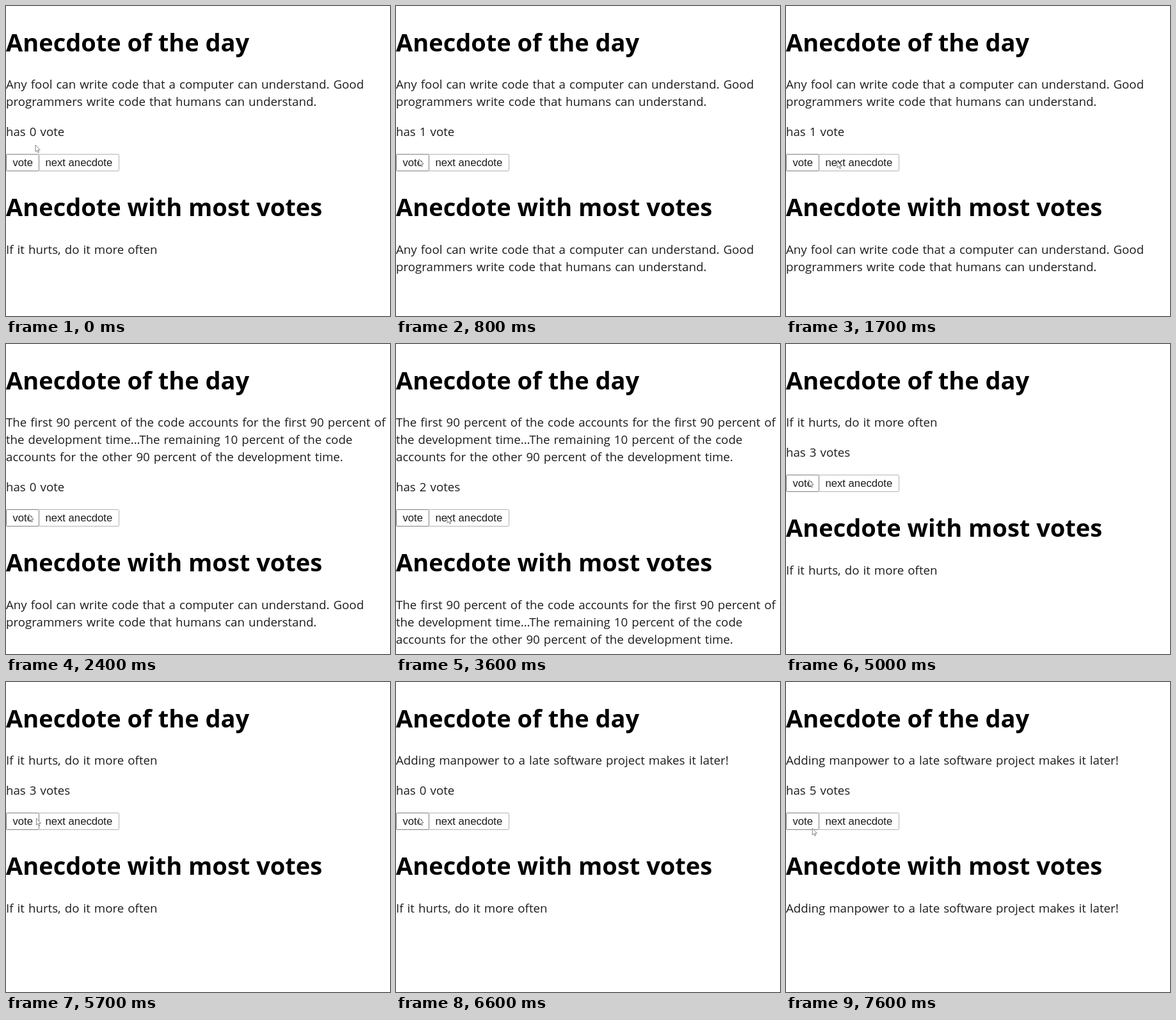
An HTML page that plays this animation: 600x484 px, repeating every 7.7 s.

```html
<!DOCTYPE html>
<html lang="en">
<head>
<meta charset="utf-8">
<title>Anecdotes</title>
<style>
  html, body { margin: 0; width: 100%; height: 100%; overflow: hidden; background: #fff; }
  svg { display: block; }
  text { font: 18.7px "Open Sans", "Noto Sans", sans-serif; word-spacing: 1.2px; fill: #1c1c1c; }
  .title { font-size: 38px; font-weight: 700; word-spacing: 0; fill: #000; }
  .label { font: 16.667px "Liberation Sans", Arial, sans-serif; word-spacing: 0; }
  rect { fill: #fff; stroke: #808080; }
  .next { stroke: #b4b4b4; }
  .arrow { fill: #fff; stroke: #666; stroke-width: .8; }
  .beam { fill: none; stroke: #666; }
</style>
</head>
<body>
<svg id="stage" width="600" height="484"></svg>
<script>
const LOOP = 7700, STEP = 100, LINE = 26.75, GLIDE = 300;

const anecdotes = [
  ["If it hurts, do it more often"],
  ["Adding manpower to a late software project makes it later!"],
  ["The first 90 percent of the code accounts for the first 90 percent of",
   "the development time...The remaining 10 percent of the code",
   "accounts for the other 90 percent of the development time."],
  ["Any fool can write code that a computer can understand. Good",
   "programmers write code that humans can understand."]
];

// Each round shows one anecdote, which is voted for and then skipped.
const rounds = [
  { start: 0, pick: 3, votes: 1 },
  { start: 1900, pick: 2, votes: 2 },
  { start: 3800, pick: 0, votes: 3 },
  { start: 6100, pick: 1, votes: 5 }
];
const HOME = [46, 217], EXIT = [43, 234];

const shift = round => Math.round((anecdotes[round.pick].length - 1) * LINE);
const voteSpot = round => [36, 212 + shift(round)];
const nextSpot = round => [80, 215 + shift(round)];

function votesAt(round, t) {
  const sinceFirst = t - round.start - 600;
  const cast = Math.floor(sinceFirst / (900 / round.votes)) + 1;
  return Math.max(0, Math.min(round.votes, cast));
}

function ease(t, start) {
  const k = Math.max(0, Math.min(1, (t - start) / GLIDE));
  return k * k * (3 - 2 * k);
}

function pointerAt(t, i) {
  const round = rounds[i], following = rounds[i + 1];
  const from = i ? nextSpot(rounds[i - 1]) : HOME;
  const to = following ? nextSpot(round) : EXIT;
  const leave = following ? following.start - 500 : LOOP - GLIDE;
  const arriving = ease(t, round.start + 200), leaving = ease(t, leave);
  return voteSpot(round).map((v, axis) =>
    from[axis] + (v - from[axis]) * arriving + (to[axis] - v) * leaving);
}

const text = (str, x, y, cls = "") => `<text class="${cls}" x="${x}" y="${y}">${str}</text>`;
const paragraph = (lines, y) =>
  lines.map((line, i) => text(line, 0, y + Math.round(i * LINE))).join("");
const button = (label, x, y, width, cls) =>
  `<rect class="${cls}" x="${x + .5}" y="${y + .5}" width="${width}" height="26" rx="1"/>` +
  text(label, x + 10.5, y + 19, "label");

function pointer([x, y], textTop) {
  const shape = y > textTop
    ? '<path class="beam" d="M-2-5.5H-.5L0-5L.5-5.5H2M0-5V5M-2 5.5H-.5L0 5L.5 5.5H2"/>'
    : '<path class="arrow" d="M0 0V10.5L2.4 8.3L4 12L5.5 11.3L4 7.8H7.2Z"/>';
  return `<g transform="translate(${x} ${y})">${shape}</g>`;
}

function draw(t) {
  const votes = anecdotes.map(() => 0);
  for (const r of rounds) votes[r.pick] = votesAt(r, t);
  const current = rounds.filter(r => r.start <= t).length - 1;
  const round = rounds[current], shown = round.pick, count = votes[shown];
  const best = votes.indexOf(Math.max(...votes));
  const dy = shift(round);

  stage.innerHTML =
    text("Anecdote of the day", 0, 71, "title") +
    paragraph(anecdotes[shown], 129) +
    text(`has ${count} vote${count > 1 ? "s" : ""}`, 0, 176 + dy) +
    button("next anecdote", 51, 204 + dy, 125, "next") +
    button("vote", 0, 204 + dy, 51, "vote") +
    text("Anecdote with most votes", 0, 301 + dy, "title") +
    paragraph(anecdotes[best], 360 + dy) +
    pointer(pointerAt(t, current), 257 + dy);
}

const stage = document.getElementById("stage");
let last = -1;
function tick() {
  const t = Math.floor(performance.now() % LOOP / STEP) * STEP;
  if (t !== last) draw(last = t);
  requestAnimationFrame(tick);
}
tick();
</script>
</body>
</html>
```
